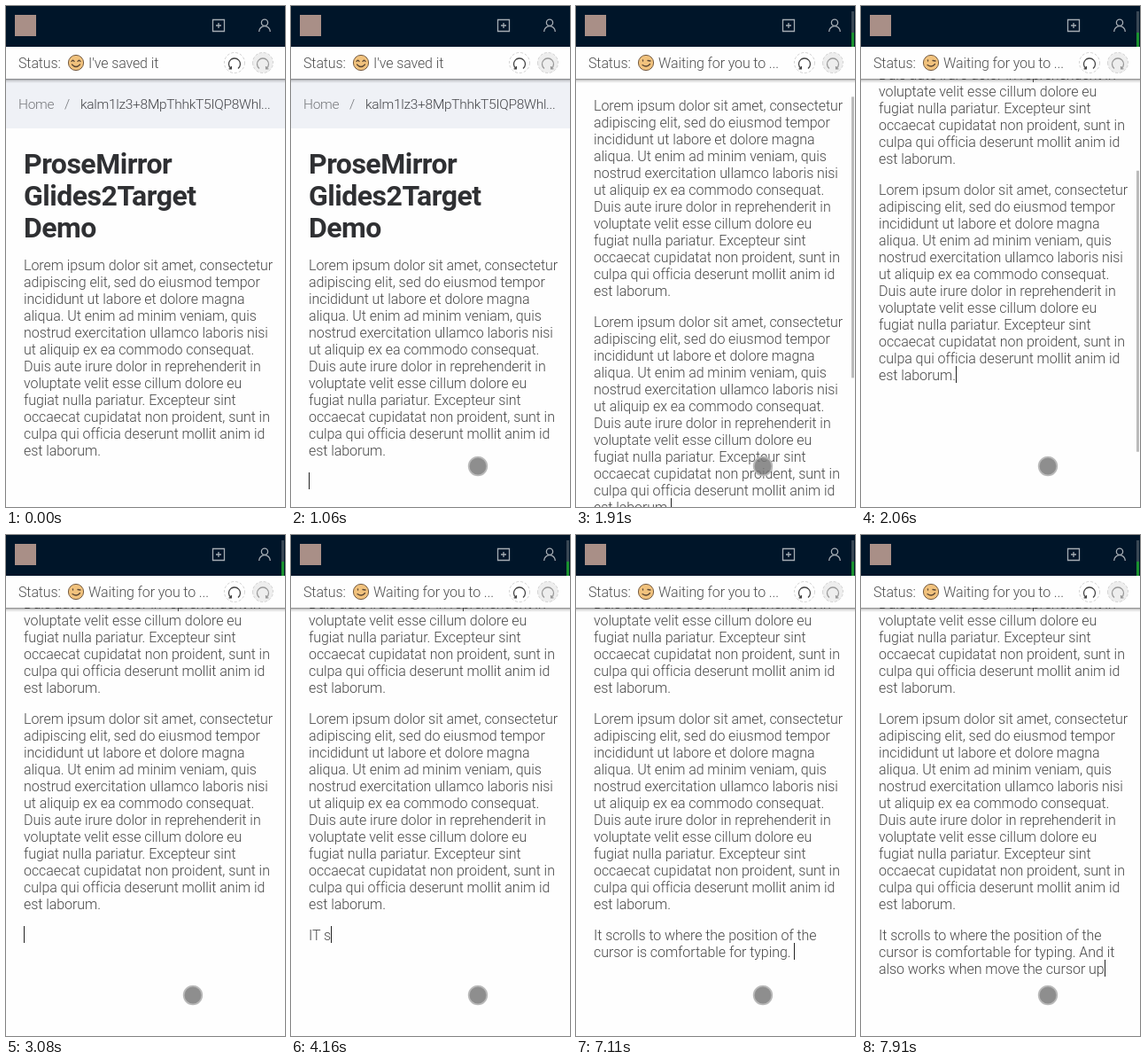
An HTML page for the animation above (8 s loop, 315 by 565 pixels).

```html
<!DOCTYPE html>
<html lang="en">
<head>
<meta charset="utf-8">
<style>
  html, body { margin: 0; width: 100%; height: 100%; overflow: hidden; background: #fefefe; }
  svg { display: block; width: 315px; height: 565px; }
  text { font: 300 16px Roboto, sans-serif; letter-spacing: -.06px; fill: #484848; white-space: pre; }
  .title text { font-weight: 700; font-size: 32px; letter-spacing: -.5px; fill: #2f3033; }
  .crumbs text { font-size: 15.5px; letter-spacing: -.28px; fill: #45464a; }
  .crumbs .faint { fill: #75777b; }
  .status text { letter-spacing: -.12px; fill: #505050; }
  .line { fill: none; stroke-width: 1.3; }
</style>
</head>
<body>
<svg viewBox="0 0 315 565">
  <defs>
    <linearGradient id="shade" x2="0" y2="1">
      <stop stop-color="#000" stop-opacity=".5"/>
      <stop offset=".4" stop-color="#000" stop-opacity=".15"/>
      <stop offset="1" stop-color="#000" stop-opacity="0"/>
    </linearGradient>
    <g id="turn">
      <circle r="11.5" stroke="#d2d2d2" stroke-dasharray="3 2"/>
      <path class="line" d="M-4 6.6A6.5 6.5 0 1 1 4 6.6M-6.4 6.8h2.8V4"/>
    </g>
  </defs>

  <g id="page">
    <rect y="82" width="315" height="56" fill="#eff1f6"/>
    <g class="crumbs">
      <text class="faint" x="14" y="116">Home</text>
      <text class="faint" x="66" y="116">/</text>
      <text x="84" y="116">kalm1lz3+8MpThhkT5IQP8Whl...</text>
    </g>
    <g class="title">
      <text x="20" y="189">ProseMirror</text>
      <text x="20" y="225">Glides2Target</text>
      <text x="20" y="261">Demo</text>
    </g>
    <g id="first"></g>
    <g id="second"></g>
    <g id="typed"></g>
    <rect id="caret" width="1" height="19" fill="#222"/>
  </g>

  <rect width="315" height="46" fill="#001529"/>
  <rect x="10" y="10" width="24" height="24" fill="#a98f87"/>
  <g class="line" stroke="#a6adb4">
    <path d="M233.5 15.5h13v13h-13zM240 19v6M237 22h6"/>
    <circle cx="292" cy="18.8" r="3.6"/>
    <path d="M285.7 29a6.3 6.3 0 0 1 12.6 0"/>
  </g>
  <g id="glow">
    <rect x="311" y="6" width="3" height="24" fill="#3a4855"/>
    <rect x="311" y="30" width="3" height="16" fill="#1a922f"/>
  </g>

  <rect y="82" width="315" height="5" fill="url(#shade)"/>
  <rect y="46" width="315" height="36" fill="#fefefe"/>
  <g class="status">
    <text x="14" y="70">Status:</text>
    <text id="status" x="93" y="70"></text>
  </g>
  <g transform="translate(79 64)">
    <circle r="8.6" fill="#f1c27d" stroke="#745a40"/>
    <path id="face" class="line" stroke="#5a4633" stroke-linecap="round"/>
  </g>
  <use href="#turn" transform="translate(258 64)" fill="#fff" stroke="#444"/>
  <use href="#turn" transform="translate(290 64) scale(-1 1)" fill="#eee" stroke="#999"/>

  <rect id="bar" x="311" width="3" height="317" fill="#8c8c8c"/>
  <circle id="touch" r="10.3" fill="#777" fill-opacity=".83" stroke="#b9b9b9" stroke-width="1.8"/>
</svg>

<script>
const $ = id => document.getElementById(id);
const LOOP = 8000, STEP = 78, BLINK = 480, LINE = 19, LEFT = 20;
const FIRST_TOP = 282, SECOND_TOP = 526, TYPED_TOP = 770;
const TOUCH = 450, CLICK = 910, RELEASE = 1060, PASTE = 1750, SCROLLED = 2060, ENTER = 3080;

const lorem = `Lorem ipsum dolor sit amet, consectetur
adipiscing elit, sed do eiusmod tempor
incididunt ut labore et dolore magna
aliqua. Ut enim ad minim veniam, quis
nostrud exercitation ullamco laboris nisi
ut aliquip ex ea commodo consequat.
Duis aute irure dolor in reprehenderit in
voluptate velit esse cillum dolore eu
fugiat nulla pariatur. Excepteur sint
occaecat cupidatat non proident, sunt in
culpa qui officia deserunt mollit anim id
est laborum.`;

// Phrases typed evenly from start to end; '<' erases one character.
const phrases = [
  { start: 3620, end: 4160, keys: 'IT s' },
  { start: 4620, end: 4860, keys: '<<<' },
  { start: 4930, end: 5250, keys: 't s' },
  { start: 5650, end: 6040, keys: 'crolls to where t' },
  { start: 6190, end: 6260, keys: 'he position of the\ncursor' },
  { start: 6410, end: 6560, keys: ' is ' },
  { start: 6810, end: 6880, keys: 'comfortable for typing. ' },
  { start: 7430, end: 7660, keys: 'And it\nalso works when m' },
  { start: 7830, end: 7910, keys: 'ove the cursor up' }
];

// Progress from 0 to 1 that advances in steps of about STEP ms.
function stepped(time, start, end) {
  const steps = Math.round((end - start) / STEP);
  const progress = Math.min(1, Math.max(0, (time - start) / (end - start)));
  return Math.floor(progress * steps) / steps;
}

const mix = (from, to, amount) => from + (to - from) * amount;
const easeInOut = p => (1 - Math.cos(Math.PI * p ** .935)) / 2;
const easeOut = p => 1 - (1 - p) ** 1.5;

function set(id, attributes) {
  for (const [name, value] of Object.entries(attributes)) $(id).setAttribute(name, value);
}

function write(id, content, top) {
  if ($(id).dataset.content === content) return;
  $(id).dataset.content = content;
  $(id).innerHTML = content && content.split('\n').map((line, i) =>
    `<text x="${LEFT}" y="${top + 16 + i * LINE}">${line}</text>`).join('');
}

function typedText(time) {
  let text = '';
  for (const { start, end, keys } of phrases) {
    if (time < start) break;
    const count = 1 + Math.floor((keys.length - 1) * stepped(time, start, end));
    for (const key of keys.slice(0, count)) text = key === '<' ? text.slice(0, -1) : text + key;
  }
  return text;
}

function drawCaret(time) {
  const [id, top] = time < ENTER ? ['second', SECOND_TOP] : ['typed', TYPED_TOP];
  const lines = $(id).children;
  const last = lines[lines.length - 1];
  const inputs = [CLICK, PASTE, ENTER, ...phrases.map(p => Math.max(p.start, Math.min(time, p.end)))];
  const lastInput = Math.max(...inputs.filter(input => input <= time));
  const shown = time >= CLICK && Math.floor((time - lastInput) / BLINK) % 2 === 0;
  set('caret', {
    x: LEFT + (last ? Math.round(last.getComputedTextLength()) : 0),
    y: top + Math.max(0, lines.length - 1) * LINE,
    opacity: shown ? 1 : 0
  });
}

function drawTouch(time) {
  const p = easeOut(stepped(time, TOUCH, 680));
  const scale = time >= CLICK && time < RELEASE ? 1.1 : 1;
  set('touch', {
    opacity: time >= TOUCH ? 1 : 0,
    transform: `translate(${mix(257, 211, p)} ${mix(557, 519, p)}) scale(${scale})`
  });
}

function draw(time) {
  const pasted = time >= PASTE;
  const offset = pasted ? mix(8, 329, easeInOut(stepped(time, PASTE, SCROLLED))) : 0;
  set('page', { transform: `translate(0 ${-Math.round(offset)})` });
  write('first', lorem, FIRST_TOP);
  write('second', pasted ? lorem : '', SECOND_TOP);
  write('typed', typedText(time), TYPED_TOP);
  drawCaret(time);

  $('status').textContent = pasted ? 'Waiting for you to ...' : "I've saved it";
  set('face', {
    d: pasted ? 'M-3.5-3v1M2-2.5l3 .5M-4 2.5Q1 6 4.5 1.5'
              : 'M-5-1.5q1.5-2.5 3 0M2-1.5q1.5-2.5 3 0M-4.5 2Q0 7 4.5 2'
  });
  set('glow', { opacity: time >= PASTE + STEP ? 1 : 0 });
  set('bar', {
    y: 1.5 + .56 * offset,
    opacity: pasted ? .58 * (1 - stepped(time, 2380, 2610)) : 0
  });
  drawTouch(time);
}

function tick() {
  draw(performance.now() % LOOP);
  requestAnimationFrame(tick);
}
tick();
</script>
</body>
</html>
```
